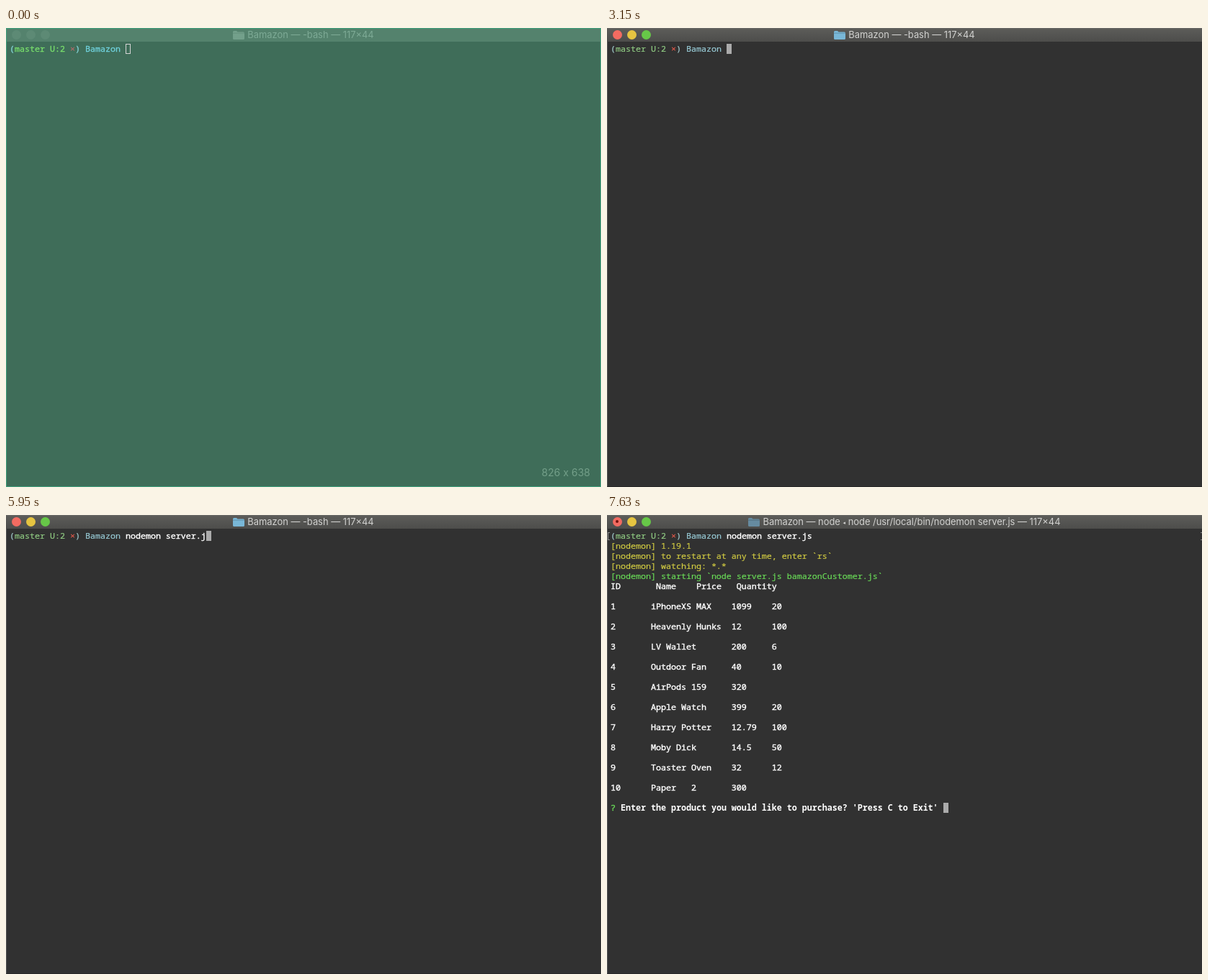
Write an HTML page that moves like this. It is 826 px wide and 638 px high and loops after 8 s.

```html
<!DOCTYPE html>
<html lang="en">
<head>
<meta charset="utf-8">
<title>Terminal</title>
<style>
  html, body { margin: 0; width: 100%; height: 100%; overflow: hidden; background: #313131; }
  #win { position: relative; width: 826px; height: 638px; overflow: hidden; background: #313131; }
  #win::before { content: ""; position: absolute; inset: 0; border-left: 1px solid #555; border-bottom: 1px solid #292929; }

  #bar { position: absolute; left: 0; top: 0; width: 826px; height: 19px;
    background: linear-gradient(#5d5d5a, #4d4d4b); box-shadow: inset 0 1px #6a6a67; }
  #bar i { position: absolute; top: 2.5px; width: 13px; height: 13px; border-radius: 50%; }
  #close { left: 7.5px; background: #f26b61; }
  #mini { left: 27.5px; background: #e5c441; }
  #zoom { left: 47.5px; background: #67c748; }
  #caption { display: flex; justify-content: center; align-items: center; gap: 4px; height: 19px;
    font: 12.9px/19px Inter, Roboto, sans-serif; color: #d2d2d0; white-space: pre; }
  #caption svg { width: 16px; height: 12px; fill: #79b7d7; }
  #name small { font-size: 7px; vertical-align: 1px; line-height: 1; }

  .busy #close::after { content: ""; position: absolute; left: 4.5px; top: 4.5px; width: 4px; height: 4px;
    border-radius: 50%; background: #70120d; }
  .busy #caption svg { fill: #668ba0; }

  pre { position: absolute; left: 5px; top: 22px; margin: 0; tab-size: 8;
    font: 11.667px/14px "Noto Sans Mono", "DejaVu Sans Mono", monospace; color: #fff;
    -webkit-text-stroke: .2px; }
  pre span { color: var(--c); }
  .paren { --c: #a5cfd2; }
  .branch { --c: #8fca82; }
  .cross { --c: #e65a4c; }
  .dir { --c: #98cbd6; }
  .warn { --c: #d0ca42; }
  .ok { --c: #69da57; }
  #typed, #table { -webkit-text-stroke: .4px; }
  #table b { -webkit-text-stroke: 0; }
  #cursor { position: absolute; width: 7px; height: 14px; box-sizing: border-box; background: #ababab; }
  .mark { position: absolute; top: 24px; width: 2px; height: 9px; border: solid #8a8a8a; display: none; }
  #markL { left: 1px; border-width: 1px 0 1px 1px; }
  #markR { left: 824px; border-width: 1px 1px 1px 0; }
  .busy .mark { display: block; }

  .idle #bar { background: #4a4946; box-shadow: inset 0 1px #545350; }
  .idle #bar i { background: #6c6b69; }
  .idle #caption { color: #92918f; }
  .idle #caption svg { fill: #7b7a78; }
  .idle .paren { --c: #86d8dc; }
  .idle .branch { --c: #79df6c; }
  .idle .cross { --c: #b36a6a; }
  .idle .dir { --c: #70d3de; }
  .idle pre { -webkit-text-stroke: .3px; }
  .idle #cursor { background: none; border: 1px solid #d5d5d5; }

  #tint { position: absolute; inset: 0; box-sizing: border-box; background: rgba(79, 169, 129, .5);
    border: 1px solid #3f9f7b; display: none; }
  #tint span { position: absolute; right: 14px; bottom: 11px; font: 14px/17px Inter, Roboto, sans-serif; color: #739f89; }
  .sizing #tint { display: block; }
  .sizing #bar { background: #5a5a59; }
  .sizing #caption { color: #aeacaa; }
  .sizing #caption svg { fill: #9a9896; }
</style>
</head>
<body>
<div id="win">
  <div id="bar">
    <div id="caption"><svg viewBox="0 0 16 12"><path d="M0 1.5Q0 0 1.5 0H5L6.5 1.5H14.5Q16 1.5 16 3V10.5Q16 12 14.5 12H1.5Q0 12 0 10.5Z"/><path d="M0 3.2H16" stroke="#0003"/></svg><span id="name">Bamazon — <span id="parent">node <small>◂</small> </span><span id="job"></span> — 117×44</span></div>
    <i id="close"></i><i id="mini"></i><i id="zoom"></i>
  </div>
  <div id="tint"><span>826 x 638</span></div>
  <b class="mark" id="markL"></b><b class="mark" id="markR"></b>
  <pre><span class="paren">(</span><span class="branch">master U:2</span> <span class="cross">×</span><span class="paren">)</span> <span class="dir">Bamazon</span> <span id="typed"></span>
<span id="log"><span class="warn">[nodemon] 1.19.1
[nodemon] to restart at any time, enter `rs`
[nodemon] watching: *.*
</span><span class="ok">[nodemon] starting `node server.js bamazonCustomer.js`</span>
</span><span id="table"></span></pre>
  <div id="cursor"></div>
</div>
<script>
  const $ = id => document.getElementById(id);
  const LOOP = 8000, FOCUS = 560, ENTER = 6300, LOG = 6930, TABLE = 7210;
  const COMMAND = "nodemon server.js";
  const KEYS = [3220, 3290, 3360, 3500, 3570, 3640, 3710, 4130,
    5250, 5320, 5390, 5600, 5740, 5810, 5880, 5950, 6020];
  const ITEMS = ["iPhoneXS MAX\t1099\t20", "Heavenly Hunks\t12\t100", "LV Wallet\t200\t6",
    "Outdoor Fan\t40\t10", "AirPods\t159\t320", "Apple Watch\t399\t20", "Harry Potter\t12.79\t100",
    "Moby Dick\t14.5\t50", "Toaster Oven\t32\t12", "Paper\t2\t300"];

  $("table").innerHTML = "ID\t Name\t Price\t Quantity\n\n" +
    ITEMS.map((item, i) => `${i + 1}\t${item}\n\n`).join("") +
    `<span class="ok">?</span> <b>Enter the product you would like to purchase? 'Press C to Exit'</b> `;

  // Cursor cell as [column, row]
  function cursorCell(t, typed) {
    if (t < ENTER) return [23 + typed, 0];
    if (t < LOG) return [0, 1];
    return t < TABLE ? [0, 5] : [66, 27];
  }

  function setText(el, text) {
    if (el.textContent !== text) el.textContent = text;
  }

  function show(id, visible) {
    $(id).style.display = visible ? "" : "none";
  }

  function draw(t) {
    const typed = KEYS.filter(k => k <= t).length;
    const [col, row] = cursorCell(t, typed);
    const state = $("win").classList;
    state.toggle("sizing", t < 70);
    state.toggle("idle", t < FOCUS);
    state.toggle("busy", t >= ENTER);
    setText($("job"), t < ENTER ? "-bash" : "node /usr/local/bin/nodemon server.js");
    setText($("typed"), COMMAND.slice(0, typed));
    show("parent", t >= LOG);
    show("log", t >= LOG);
    show("table", t >= TABLE);
    $("cursor").style.left = 5 + col * 7 + "px";
    $("cursor").style.top = 22 + row * 14 + "px";
  }

  function tick() {
    draw(performance.now() % LOOP);
    requestAnimationFrame(tick);
  }
  tick();
</script>
</body>
</html>
```
